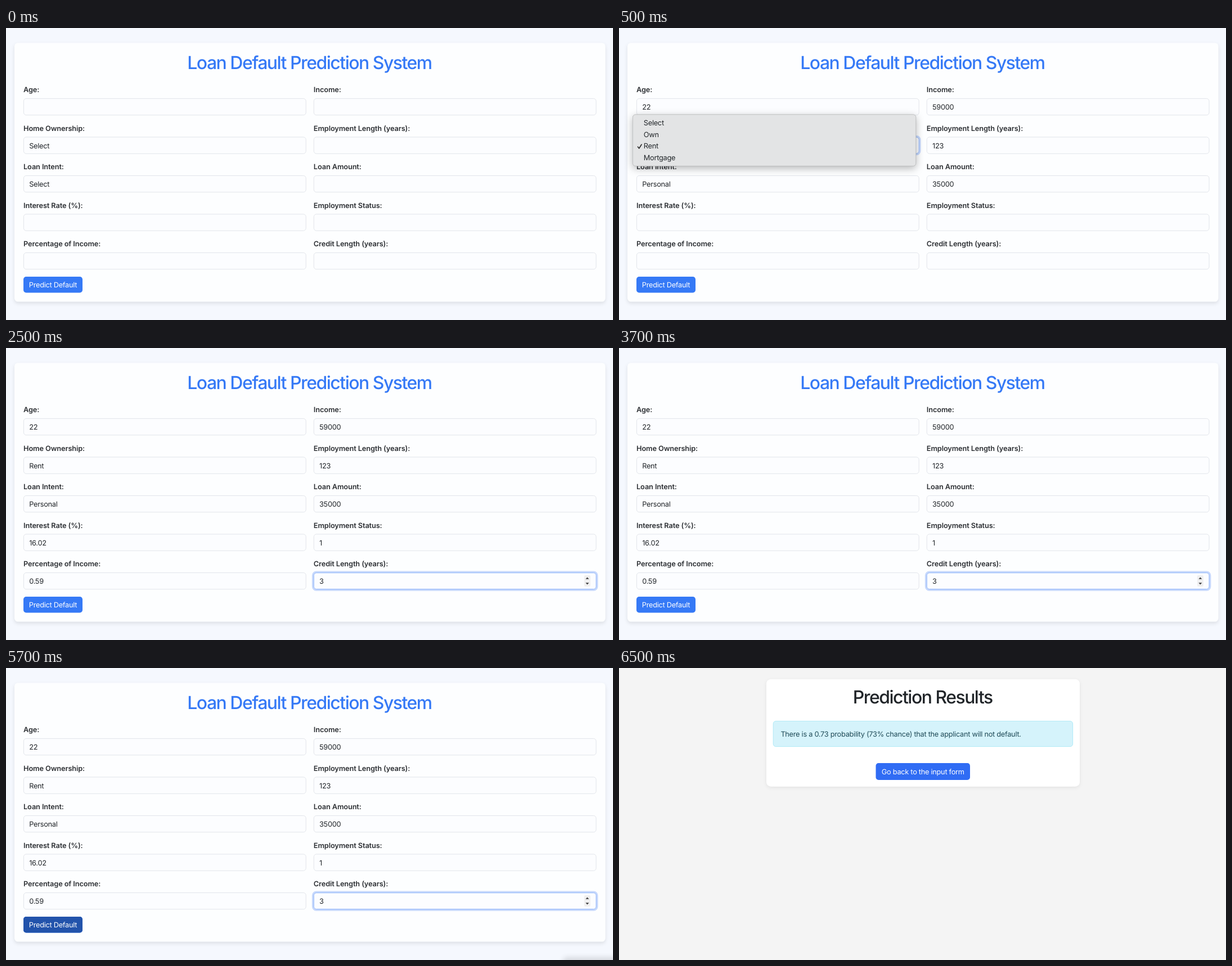
These frames come from a looping animation (1079x519 px, 8000 ms). An HTML page:

```html
<!DOCTYPE html>
<html lang="en">
<head>
<meta charset="utf-8">
<title>Loan Default Prediction System</title>
<style>
  html, body { margin: 0; width: 100%; height: 100%; overflow: hidden; background: #f5f8fe; }
  svg { display: block; width: 1079px; height: 519px; }
  text {
    font: 400 12.75px Inter, "Noto Sans", sans-serif;
    font-optical-sizing: none;
    letter-spacing: -.021em;
    text-rendering: geometricPrecision;
    fill: #212529;
  }
  .title { font-size: 31.9px; font-weight: 500; letter-spacing: -.046em; text-anchor: middle; }
  .label { font-weight: 600; letter-spacing: -.008em; fill: #2c2f33; }
  .btn { fill: #fff; text-anchor: middle; }
  .field { fill: #fcfdff; stroke: #dfe3e8; stroke-width: .9; }
  .card { filter: drop-shadow(0 3px 3.2px rgba(0, 0, 0, .1)); }
  .ring { fill: none; stroke: #c6d8fc; stroke-width: 3.2; }
  .focus { fill: #fcfdff; stroke: #8db3fa; stroke-width: 1; }
  .menu { fill: #e3e4e5; stroke: #b4b5b7; stroke-width: .8; filter: drop-shadow(0 4px 7px rgba(0, 0, 0, .28)); }
</style>
</head>
<body>
<svg id="stage" viewBox="0 0 1079 519"></svg>
<script>
const LOOP = 8000;
const NS = "http://www.w3.org/2000/svg";
const stage = document.getElementById("stage");
const COLS = [31, 546.8];
const ROW = 68.5;
const FIELD_W = 502.6;
const LABELS = [
  ["Age:", "Income:"],
  ["Home Ownership:", "Employment Length (years):"],
  ["Loan Intent:", "Loan Amount:"],
  ["Interest Rate (%):", "Employment Status:"],
  ["Percentage of Income:", "Credit Length (years):"]
];

function add(parent, tag, attrs = {}, text = "") {
  const el = document.createElementNS(NS, tag);
  for (const k in attrs) el.setAttribute(k, attrs[k]);
  if (text) el.textContent = text;
  parent.append(el);
  return el;
}

const rect = (p, x, y, width, height, rx, attrs) =>
  add(p, "rect", { x, y, width, height, rx, ...attrs });

const write = (p, x, y, str, cls = "") => add(p, "text", { x, y, class: cls }, str);

// Group that is visible only between two times
function layer(from, to) {
  const g = add(stage, "g");
  const on = t => t >= from && t < to ? 1 : 0;
  const times = [...new Set([0, from, to, LOOP])].sort((a, b) => a - b);
  g.animate(
    times.map(t => ({
      offset: t / LOOP,
      opacity: on(t === LOOP ? LOOP - 1 : t),
      easing: "step-end"
    })),
    { duration: LOOP, iterations: Infinity }
  );
  return g;
}

const fieldY = row => 125.4 + row * ROW;

function value(p, row, col, str) {
  write(p, COLS[col] + 10.2, fieldY(row) + 19.6, str);
}

function focusRing(p, row, col) {
  const x = COLS[col], y = fieldY(row);
  rect(p, x - 1.3, y - 1.3, FIELD_W + 2.6, 32, 6, { class: "ring" });
  rect(p, x + .4, y + .3, FIELD_W - .8, 28.8, 4.6, { class: "focus" });
}

function button(p, x, y, w, h, fill, str) {
  rect(p, x, y, w, h, 4.8, { fill });
  write(p, x + w / 2, y + h / 2 + 4.6, str, "btn");
}

const submit = (p, fill) => button(p, 31, 442, 105, 28.5, fill, "Predict Default");

function spinner(p, x, y) {
  rect(p, x - 5.5, y - 10, 11, 20, 2, { fill: "#efeff0" });
  for (const s of [-1, 1])
    add(p, "path", { d: `M${x - 3} ${y + s * 3.2}h6l-3 ${s * 3.2}z`, fill: "#3c3c3e" });
}

// Form
const form = layer(0, 6500);
rect(form, 15, 26.5, 1050.5, 460, 6.4, { fill: "#fdfeff", class: "card" });
write(form, 539.5, 73.3, "Loan Default Prediction System", "title").style.fill = "#3579f6";
LABELS.forEach((pair, row) => pair.forEach((str, col) => {
  write(form, COLS[col], 114 + row * ROW, str, "label");
  rect(form, COLS[col] + .4, fieldY(row), FIELD_W - .8, 29.4, 4.6, { class: "field" });
}));
submit(form, "#3579f6");

// Empty selects
const empty = layer(0, 500);
value(empty, 1, 0, "Select");
value(empty, 2, 0, "Select");

// First entries
const first = layer(500, 6500);
[[0, 0, "22"], [0, 1, "59000"], [1, 1, "123"], [2, 0, "Personal"], [2, 1, "35000"]]
  .forEach(v => value(first, ...v));

// Open menu
const menu = layer(500, 2500);
focusRing(menu, 1, 0);
rect(menu, 24.4, 153.8, 503.4, 91.6, 5, { class: "menu" });
["Select", "Own", "Rent", "Mortgage"].forEach((str, i) => {
  write(menu, 43.8, 172.9 + i * 20.7, str);
});
add(menu, "path", {
  d: "M33.4 211l2.3 3 4.4-7", fill: "none", stroke: "#222",
  "stroke-width": 1.5, "stroke-linecap": "round", "stroke-linejoin": "round"
});

// Remaining entries
const rest = layer(2500, 6500);
focusRing(rest, 4, 1);
spinner(rest, 1033.3, 414);
[[1, 0, "Rent"], [3, 0, "16.02"], [3, 1, "1"], [4, 0, "0.59"], [4, 1, "3"]]
  .forEach(v => value(rest, ...v));

// Pressed button and the soft shade in the corner
const pressed = layer(4500, 6500);
submit(pressed, "#2253ab");
rect(pressed, 990, 514, 120, 30, 8, { fill: "#000", opacity: .12, style: "filter:blur(5px)" });

// Results page
const result = layer(6500, LOOP);
rect(result, 0, 0, 1079, 519, 0, { fill: "#f4f4f4" });
rect(result, 262, 20, 557, 190.7, 8, {
  fill: "#fff", style: "filter:drop-shadow(0 2px 3px rgba(0,0,0,.07))"
});
write(result, 539.7, 62.8, "Prediction Results", "title");
rect(result, 274.2, 94.4, 532.4, 45.2, 4.6, { fill: "#d5f3fb", stroke: "#a9e8f6", "stroke-width": .9 });
write(result, 287.4, 121.8, "There is a 0.73 probability (73% chance) that the applicant will not default.")
  .style.fill = "#1f4b57";
button(result, 456.5, 169, 167.5, 30, "#306cf4", "Go back to the input form");
</script>
</body>
</html>
```
